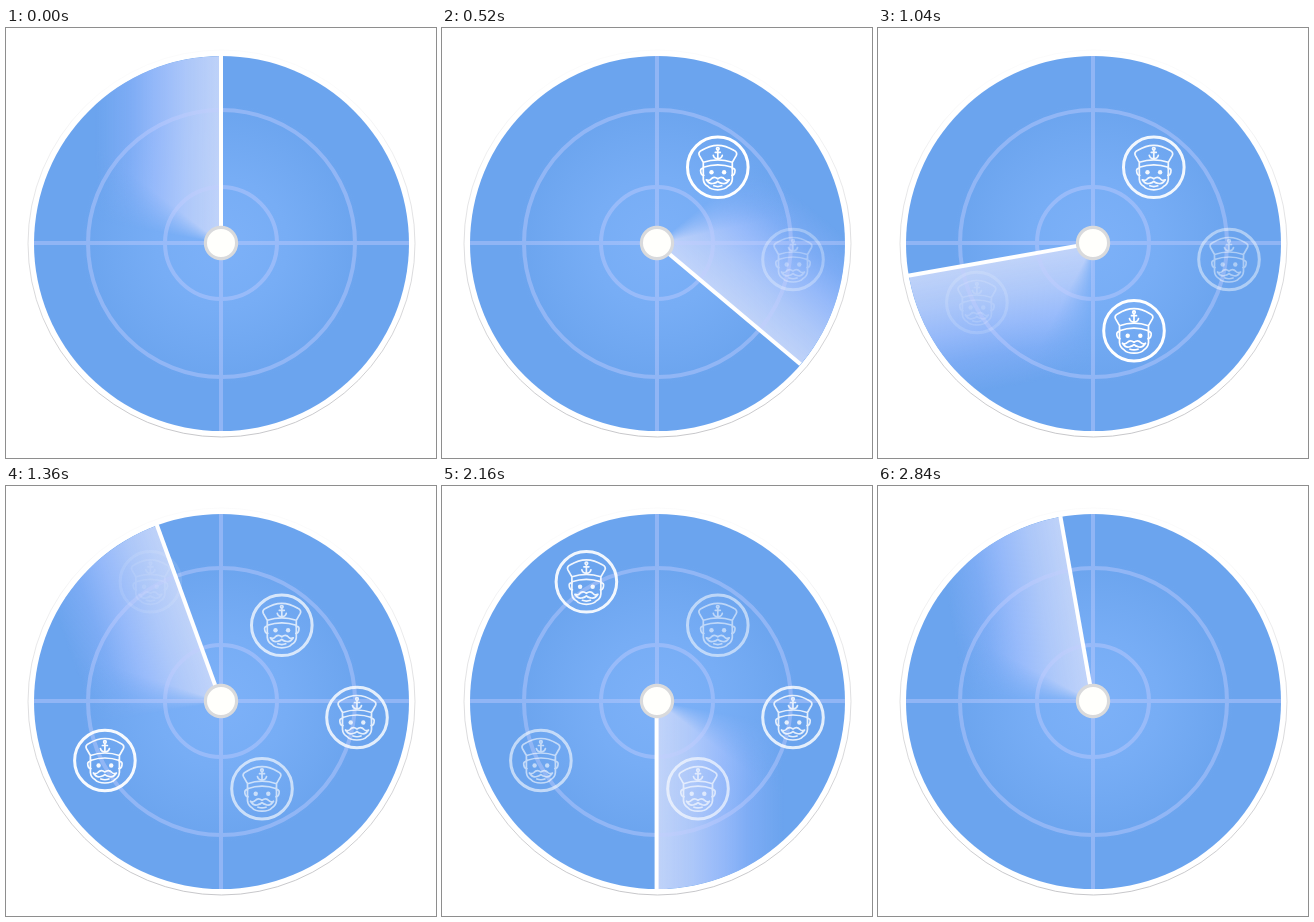
Recreate the animation shown at these times as an HTML page. Size 430 by 430 pixels, loop 2.88 s.

```html
<!DOCTYPE html>
<html lang="en">
<head>
<meta charset="utf-8">
<title>Radar</title>
<style>
  html, body { margin: 0; width: 100%; height: 100%; overflow: hidden; background: #fff; }
  #stage { position: absolute; left: 0; top: 0; width: 100%; height: 100%; overflow: hidden; contain: strict; }
  svg { position: absolute; left: 0; top: 0; width: 430px; height: 430px; }
  #disc {
    position: absolute; left: 28px; top: 28px; width: 375px; height: 375px;
    border-radius: 50%; overflow: hidden; contain: paint;
  }
  #wake {
    width: 100%; height: 100%; border-radius: 50%;
    background: linear-gradient(to left,
      rgba(198, 214, 249, .93) 187.5px,
      rgba(182, 204, 250, .87) 222px,
      rgba(164, 192, 253, .75) 252px,
      rgba(146, 181, 252, .45) 280px,
      rgba(140, 178, 250, 0) 314px);
    --wedge: conic-gradient(transparent 280deg, #000 308deg);
    -webkit-mask: var(--wedge);
    mask: var(--wedge);
  }
</style>
</head>
<body>
<div id="stage">
<svg viewBox="0 0 430 430">
  <defs>
    <radialGradient id="sea">
      <stop offset="0" stop-color="#7db1f8"/>
      <stop offset=".35" stop-color="#77adf5"/>
      <stop offset=".75" stop-color="#6ba4ee"/>
      <stop offset="1" stop-color="#6ba4ee"/>
    </radialGradient>
    <linearGradient id="rim" x2="0" y2="1">
      <stop offset=".1" stop-color="#b4b4b8" stop-opacity=".05"/>
      <stop offset=".45" stop-color="#b4b4b8" stop-opacity=".4"/>
      <stop offset="1" stop-color="#b4b4b8" stop-opacity=".75"/>
    </linearGradient>
  </defs>
  <circle cx="215.5" cy="215.5" r="193.5" fill="none" stroke="url(#rim)"/>
  <circle cx="215.5" cy="215.5" r="187.5" fill="url(#sea)"/>
</svg>

<div id="disc"><div id="wake"></div></div>

<svg viewBox="0 0 430 430">
  <defs>
    <g id="captain" fill="none" stroke="#fff" stroke-width="1.7" stroke-linecap="round" stroke-linejoin="round">
      <circle r="30.3" stroke-width="3"/>
      <!-- cap -->
      <path d="M-14.5-5 L-18.5-12 Q-20-15-16-17 Q0-27 16-17 Q20-15 18.5-12 L14.5-5 Q0-10-14.5-5 V0 Q0-5 14.5 0 V-5"/>
      <!-- anchor -->
      <path d="M0-17 V-9 M-2.5-15 H2.5 M-4.5-12 Q-4-9 0-8.5 Q4-9 4.5-12"/>
      <circle cy="-18.5" r="1.3"/>
      <!-- ears, face and beard -->
      <path d="M-14.5 1 Q-18 1-17 5 Q-16.5 8-14 8 M14.5 1 Q18 1 17 5 Q16.5 8 14 8"/>
      <path d="M-14.5 0 V12 Q-14 17-10 19 Q-7 22.5 0 22.5 Q7 22.5 10 19 Q14 17 14.5 12 V0"/>
      <path d="M-4 18.5 Q0 20 4 18.5"/>
      <!-- moustache -->
      <path d="M0 11.5 Q-4 8.5-7 12 Q-9 14-11.5 12.5 Q-8.5 17.5-4 16 Q-1.5 15.5 0 14 Q1.5 15.5 4 16 Q8.5 17.5 11.5 12.5 Q9 14 7 12 Q4 8.5 0 11.5Z"/>
      <g fill="#fff" stroke="none"><circle cx="-6.3" cy="5" r="2.2"/><circle cx="6.3" cy="5" r="2.2"/></g>
    </g>
  </defs>
  <g fill="none" stroke="#c4ceff" opacity=".42" stroke-width="4">
    <path d="M28 215H403M215 28V403"/>
    <circle cx="215" cy="215" r="56"/>
    <circle cx="215.5" cy="215.5" r="133.5"/>
  </g>
  <path id="beam" d="M215 215V27.5" stroke="#fff" stroke-width="4"/>
  <g id="blips"></g>
  <circle cx="215" cy="215" r="15.6" fill="#fffffc" stroke="#d9dadc" stroke-width="3.2"/>
</svg>
</div>

<script>
  const FRAME = 40, FRAMES = 72, LAST = 2840;
  const FADE_IN = 400, PULSE = 480, DIM = 0.45;
  const byId = id => document.getElementById(id);
  const wake = byId('wake'), beam = byId('beam');

  // x, y, time at which the beam reveals the blip
  const blips = [
    [275.8, 139.3, 120], [351, 231.5, 400], [256, 302.7, 640],
    [98.9, 274.5, 980], [144.4, 95.8, 1320]
  ].map(([x, y, start]) => {
    const node = document.createElementNS('http://www.w3.org/2000/svg', 'use');
    node.setAttribute('href', '#captain');
    node.setAttribute('transform', `translate(${x} ${y})`);
    byId('blips').append(node);
    return { node, start };
  });

  function glow(age) {
    if (age < FADE_IN) return Math.max(0, age / FADE_IN);
    const phase = (age - FADE_IN) % PULSE / PULSE;
    return DIM + (1 - DIM) * Math.abs(1 - 2 * phase);
  }

  function draw() {
    const frame = Math.floor(performance.now() / FRAME) % FRAMES;
    const time = frame * FRAME;
    wake.style.transform = `rotate(${frame * 10}deg)`;
    beam.setAttribute('transform', `rotate(${frame * 10} 214.8 215.3)`);
    for (const { node, start } of blips)
      node.setAttribute('opacity', time < LAST ? glow(time - start) : 0);
    requestAnimationFrame(draw);
  }
  draw();
</script>
</body>
</html>
```
